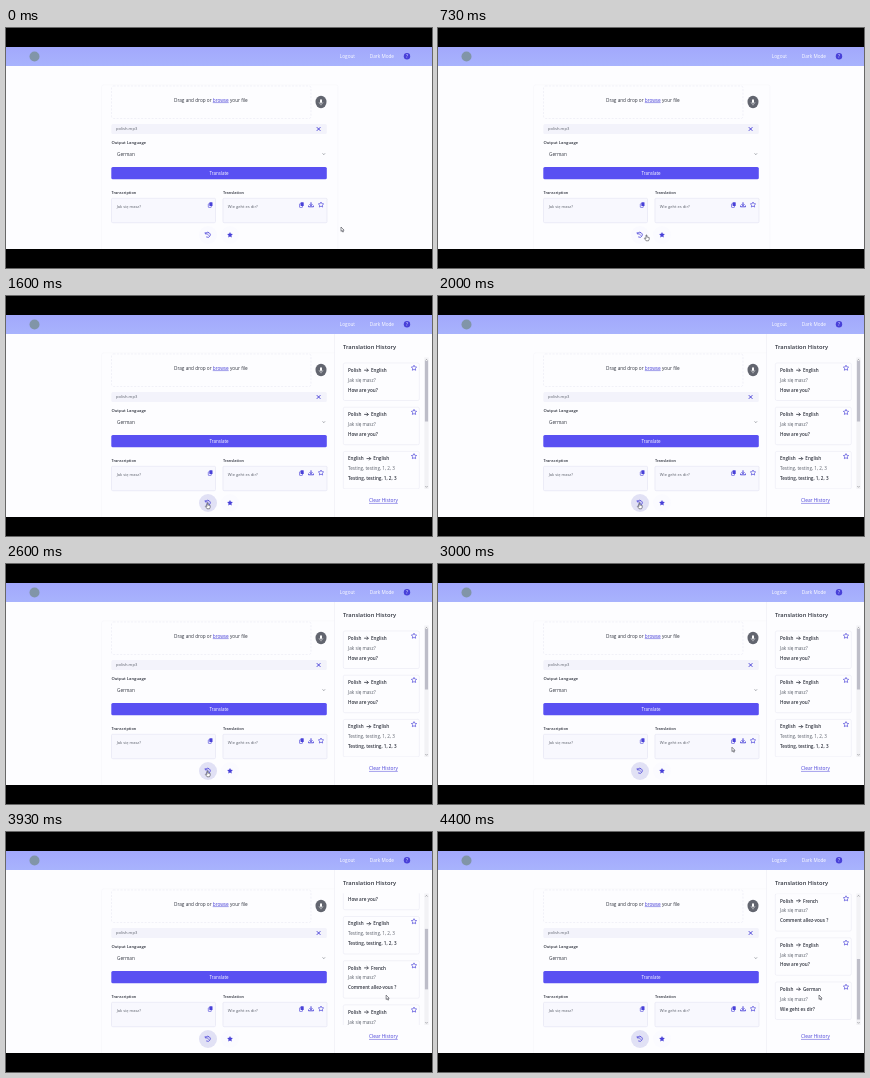
An HTML page with a canvas that plays this animation: 426x240 px, repeating every 4470 ms.

```html
<!DOCTYPE html>
<html lang="en">
<head>
<meta charset="utf-8">
<title>Translation history</title>
<style>
html, body { margin: 0; width: 100%; height: 100%; overflow: hidden; background: #000; }
canvas { display: block; width: 426px; height: 240px; }
</style>
</head>
<body>
<canvas id="stage" width="426" height="240"></canvas>
<script>
const ctx = document.getElementById('stage').getContext('2d');
const LOOP = 4470;
const INDIGO = '#4840d8', INK = '#30343f', GREY = '#5b606b', LINE = '#e9e9f4', PAGE = '#fdfdff';
const FONT = '"Open Sans", "Noto Sans", sans-serif';

// [time, x, y] of the pointer tip
const POINTER = [
  [0, 335, 199], [120, 334, 199], [650, 208, 207], [780, 208, 207],
  [1100, 201, 207], [2650, 201, 207], [3300, 367, 164.5], [3550, 367, 164.5],
  [4000, 381, 163], [LOOP, 381, 163]
];
const HISTORY = [
  ['Polish', 'English', 'Jak się masz?', 'How are you?'],
  ['Polish', 'English', 'Jak się masz?', 'How are you?'],
  ['English', 'English', 'Testing, testing, 1, 2, 3', 'Testing, testing, 1, 2, 3'],
  ['Polish', 'French', 'Jak się masz?', 'Comment allez-vous ?'],
  ['Polish', 'English', 'Jak się masz?', 'How are you?'],
  ['Polish', 'German', 'Jak się masz?', 'Wie geht es dir?']
];

const clamp = v => Math.max(0, Math.min(1, v));
const ease = v => v * v * (3 - 2 * v);
const ramp = (t, a, b) => ease(clamp((t - a) / (b - a)));

function pointerAt(t) {
  const i = Math.max(1, POINTER.findIndex(p => p[0] >= t));
  const [t0, x0, y0] = POINTER[i - 1], [t1, x1, y1] = POINTER[i];
  const k = ramp(t, t0, t1);
  return [x0 + (x1 - x0) * k, y0 + (y1 - y0) * k];
}

function text(str, x, y, size, color = GREY, weight = 400, align = 'left') {
  ctx.font = `${weight} ${size}px ${FONT}`;
  ctx.textAlign = align;
  ctx.textBaseline = 'alphabetic';
  ctx.fillStyle = color;
  ctx.fillText(str, x, y);
  return ctx.measureText(str).width;
}

function box(x, y, w, h, r, fill, stroke, dash = []) {
  ctx.beginPath();
  ctx.roundRect(x, y, w, h, r);
  if (fill) { ctx.fillStyle = fill; ctx.fill(); }
  if (stroke) {
    ctx.strokeStyle = stroke;
    ctx.lineWidth = .6;
    ctx.setLineDash(dash);
    ctx.stroke();
    ctx.setLineDash([]);
  }
}

function disc(x, y, r, fill) {
  ctx.beginPath();
  ctx.arc(x, y, r, 0, 7);
  ctx.fillStyle = fill;
  ctx.fill();
}

function line(points, color, width = .8) {
  ctx.beginPath();
  points.forEach(([x, y]) => ctx.lineTo(x, y));
  ctx.strokeStyle = color;
  ctx.lineWidth = width;
  ctx.stroke();
}

function star(x, y, r, filled) {
  ctx.beginPath();
  for (let i = 0; i < 10; i++) {
    const a = -Math.PI / 2 + i * Math.PI / 5, d = i % 2 ? r * .5 : r;
    ctx.lineTo(x + d * Math.cos(a), y + d * Math.sin(a));
  }
  ctx.closePath();
  ctx.fillStyle = ctx.strokeStyle = INDIGO;
  ctx.lineWidth = .65;
  if (filled) ctx.fill(); else ctx.stroke();
}

function copyIcon(x, y) {
  box(x - 2, y - 1, 3, 3.6, .4, null, INDIGO);
  box(x - .9, y - 2.5, 3.1, 3.8, .4, INDIGO);
}

function downloadIcon(x, y) {
  line([[x, y - 2.5], [x, y + .8]], INDIGO, 1);
  line([[x - 1.5, y - .6], [x, y + 1], [x + 1.5, y - .6]], INDIGO);
  line([[x - 2.5, y + .8], [x - 2.5, y + 2], [x + 2.5, y + 2], [x + 2.5, y + .8]], INDIGO, .9);
}

function historyIcon(x, y) {
  ctx.beginPath();
  ctx.arc(x, y, 2.5, -2.6, 2.3);
  ctx.strokeStyle = INDIGO;
  ctx.lineWidth = .8;
  ctx.stroke();
  line([[x - 2.6, y - 2.7], [x - 2.5, y - .9], [x - .7, y - .9]], INDIGO);
  line([[x, y - 1.4], [x, y + .1], [x + 1, y + .7]], INDIGO, .6);
}

function header() {
  const g = ctx.createLinearGradient(0, 19, 0, 38);
  g.addColorStop(0, '#a2a8fc');
  g.addColorStop(1, '#a8b3fd');
  ctx.fillStyle = g;
  ctx.fillRect(0, 19, 426, 19);
  disc(28.5, 28.5, 5, '#8195a8');
  text('Logout', 333.8, 30.3, 4.7, '#fff');
  text('Dark Mode', 363.8, 30.3, 4.7, '#fff');
  disc(401, 28.3, 3.2, INDIGO);
  text('?', 401, 30, 4.5, '#c8ccff', 600, 'center');
}

function panel(hover) {
  box(95.5, 57, 236.5, 175, 2, PAGE, '#f6f6fa');
  box(105.5, 58, 199.5, 32.5, 2, PAGE, LINE, [2, 1.5]);
  let x = 168;
  x += text('Drag and drop or ', x, 73.6, 4.7, INK);
  const w = text('browse', x, 73.6, 4.7, INDIGO);
  line([[x, 74.6], [x + w, 74.6]], INDIGO, .5);
  text(' your file', x + w, 73.6, 4.7, INK);

  ctx.beginPath();
  ctx.ellipse(315, 74, 5.5, 6.2, 0, 0, 7);
  ctx.fillStyle = '#62656f';
  ctx.fill();
  box(314, 71.2, 2, 3.8, 1, '#fff');
  line([[313, 74], [313.6, 75.6], [315, 76], [316.4, 75.6], [317, 74]], '#fff', .4);
  line([[315, 76], [315, 77.3]], '#fff', .5);

  box(105.3, 96, 215.5, 10, 1.5, '#f3f3fb');
  text('polish.mp3', 110, 102.4, 4.1);
  line([[310.8, 99.2], [314.4, 102.8]], INDIGO, 1);
  line([[314.4, 99.2], [310.8, 102.8]], INDIGO, 1);
  text('Output Language', 105.4, 115.8, 4.15, INK, 600);
  text('German', 111, 127.8, 4.7, INK);
  line([[316.6, 125.4], [317.8, 126.6], [319, 125.4]], GREY, .6);
  box(105.3, 139, 215.5, 12.3, 1.5, '#5950f2');
  text('Translate', 213, 146.8, 4.5, '#fff', 400, 'center');

  text('Transcription', 105.5, 165.5, 3.9, INK, 600);
  text('Translation', 217, 165.5, 3.9, INK, 600);
  box(105.5, 170.3, 104, 24.4, 1, '#f8f8fe', '#e2e2f1');
  box(217, 170.3, 104, 24.4, 1, '#f8f8fe', '#e2e2f1');
  text('Jak się masz?', 110.8, 179.5, 4);
  text('Wie geht es dir?', 221.8, 179.5, 4.1);
  copyIcon(204.3, 176.8);
  copyIcon(295.5, 176.8);
  downloadIcon(305, 176.8);
  star(315, 176.8, 2.8);

  disc(202, 207, 9, hover ? '#e1e1f5' : '#fafaff');
  disc(224, 207, 9, '#fbfbff');
  historyIcon(201.8, 206.8);
  star(224, 207, 3, true);
}

function card([from, to, original, result], y) {
  box(337.3, y, 76, 37.5, 1.5, PAGE, LINE);
  const x = 342 + text(from, 342, y + 8.9, 4.6, INK, 600);
  line([[x + 2.8, y + 7.2], [x + 7, y + 7.2]], INK, .8);
  line([[x + 5.3, y + 5.5], [x + 7, y + 7.2], [x + 5.3, y + 8.9]], INK, .8);
  text(to, x + 9.6, y + 8.9, 4.6, INK, 600);
  text(original, 342, y + 18.7, 4.6);
  text(result, 342, y + 28.5, 4.6, INK, 600);
  star(408, y + 5, 2.8);
}

function sidebar(open, scroll) {
  ctx.save();
  ctx.translate(98 * (1 - open), 0);
  ctx.fillStyle = PAGE;
  ctx.fillRect(328.5, 38, 98, 183);
  line([[328.5, 38], [328.5, 221]], '#eeeef5', .7);
  text('Translation History', 337, 53.3, 5.8, INK, 600);
  ctx.save();
  ctx.beginPath();
  ctx.rect(329, 61.5, 97, 131.5);
  ctx.clip();
  HISTORY.forEach((entry, i) => card(entry, 67 + i * 44.2 - 138 * scroll));
  ctx.restore();
  ctx.fillStyle = '#f2f2f5';
  ctx.fillRect(418.4, 61.5, 4.2, 131.5);
  ctx.fillStyle = '#bdbdc8';
  ctx.fillRect(418.9, 65 + 62 * scroll, 3.2, 60.5);
  for (const [y, d] of [[64, -1], [190.7, 1]]) {
    line([[419.4, y - d * .5], [420.5, y + d * .6], [421.6, y - d * .5]], '#85868c', .7);
  }
  const w = text('Clear History', 363, 206.3, 4.8, INDIGO);
  line([[363, 207.4], [363 + w, 207.4]], INDIGO, .5);
  ctx.restore();
}

function pointer(x, y, hand) {
  const shape = hand
    ? [[0, 0], [.9, 0], [.9, 2], [3.2, 2.5], [3.2, 4.3], [2.5, 5.8], [.1, 5.8], [-1.6, 3.4], [-1.2, 2.8], [0, 3.6]]
    : [[0, 0], [0, 4.4], [1, 3.5], [1.8, 5.1], [2.5, 4.8], [1.8, 3.2], [3.1, 3.2]];
  ctx.beginPath();
  shape.forEach(([dx, dy]) => ctx.lineTo(x + dx, y + dy));
  ctx.closePath();
  ctx.fillStyle = '#fff';
  ctx.fill();
  ctx.strokeStyle = '#33343d';
  ctx.lineWidth = .55;
  ctx.stroke();
}

function draw(t) {
  const [x, y] = pointerAt(t);
  const open = ramp(t, 1380, 1600);
  ctx.fillStyle = '#000';
  ctx.fillRect(0, 0, 426, 240);
  ctx.save();
  ctx.beginPath();
  ctx.rect(0, 19, 426, 202);
  ctx.clip();
  ctx.fillStyle = PAGE;
  ctx.fillRect(0, 19, 426, 202);
  panel(t >= 1380);
  if (open) sidebar(open, ramp(t, 3600, 4250));
  header();
  pointer(x, y, Math.abs(x - 202) < 9 && y > 198);
  ctx.restore();
}

function tick() {
  draw(performance.now() % LOOP);
  requestAnimationFrame(tick);
}
tick();
</script>
</body>
</html>
```
